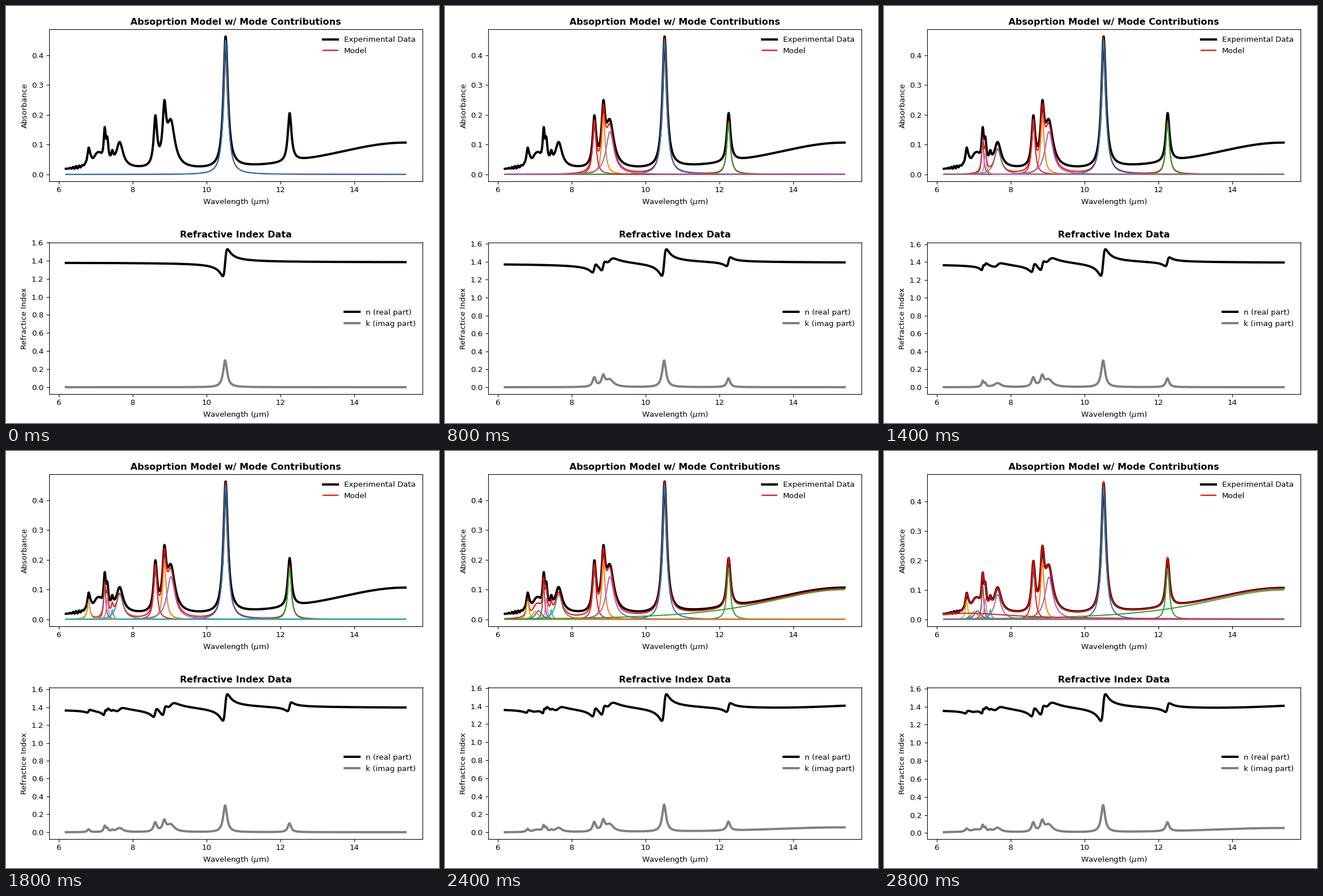
Animation of 762 by 735 pixels, one loop 3000 ms. Source, as a matplotlib script:

```python
import numpy as np
import matplotlib.pyplot as plt
from matplotlib.animation import FuncAnimation

W, H, DPI = 762, 735, 96
N0 = 1.377     # background index
DEPTH = 1.01   # optical depth factor

# line widths relative to the centre wavenumber
FINE, SHARP, SOFT, BROAD = 0.0088, 0.012, 0.0275, 0.37

nu = np.linspace(1613.5, 650, 2000)
wl = 1e4 / nu


def mode(centre, peak, rel_width=SHARP):
    """Lorentz oscillator at a wavelength in um with peak k."""
    nu0 = 1e4 / centre
    width = rel_width * nu0
    return peak * width * nu0 / (nu0**2 - nu**2 - 1j * width * nu)


def absorb(index):
    return 1 - np.exp(-DEPTH * index.real**2 * index.imag)


modes = [
    mode(10.505, 0.298),
    mode(8.857, 0.112),
    mode(12.245, 0.0985, FINE),
    mode(8.614, 0.102),
    mode(9.03, 0.0805, SOFT),
    mode(7.246, 0.064, FINE),
    mode(7.317, 0.038, FINE),
    mode(7.648, 0.046, SOFT),
    mode(6.812, 0.0325),
    mode(7.452, 0.0174, FINE),
    mode(7.107, 0.0155, SOFT),
    mode(7.02, 0.014, SOFT),
    mode(15.04, 0.054, BROAD),
    mode(6.76, 0.011, BROAD),
    mode(6.87, 0.0055),
]
totals = N0 + np.cumsum(modes, axis=0)
singles = [absorb(N0 + m) for m in modes]


def measured():
    """Full model at finite resolution, with a ripple at the short end."""
    kernel = np.exp(-0.5 * (np.arange(-6, 7) / 1.5) ** 2)
    padded = np.pad(absorb(totals[-1]), 6, mode="edge")
    smooth = np.convolve(padded, kernel / kernel.sum(), mode="valid")
    envelope = np.exp(-0.5 * ((wl - 6.5) / 0.12) ** 2)
    ripple = np.cos(2 * np.pi * (wl - 6.39) / 0.083)
    return smooth + 0.001 + 0.0045 * envelope * ripple


data = measured()
fig = plt.figure(figsize=(W / DPI, H / DPI), dpi=DPI)


def add_panel(top):
    left, width, height = 75.5, 657.5, 267.5
    return fig.add_axes([left / W, 1 - (top + height) / H,
                         width / W, height / H])


ax1, ax2 = add_panel(41.5), add_panel(416.5)


def label(ax, title, ylabel, loc):
    ax.set_title(title, fontweight="bold")
    ax.set_xlabel(r"Wavelength ($\mu$m)")
    ax.set_ylabel(ylabel)
    ax.legend(loc=loc, frameon=False)


def draw(i):
    index = totals[i]
    ax1.cla()
    ax1.plot(wl, data, color="black", lw=3, label="Experimental Data")
    ax1.plot(wl, absorb(index), color="red", label="Model")
    for j in range(i + 1):
        ax1.plot(wl, singles[j], color=f"C{j % 10}")
    label(ax1, "Absoprtion Model w/ Mode Contributions", "Absorbance",
          "upper right")

    ax2.cla()
    ax2.plot(wl, index.real, color="black", lw=3, label="n (real part)")
    ax2.plot(wl, index.imag, color="gray", lw=3, label="k (imag part)")
    label(ax2, "Refractive Index Data", "Refractice Index", "center right")
    return []


anim = FuncAnimation(fig, draw, frames=len(modes), init_func=lambda: [],
                     interval=200, repeat=True, repeat_delay=0)
plt.show()
```
